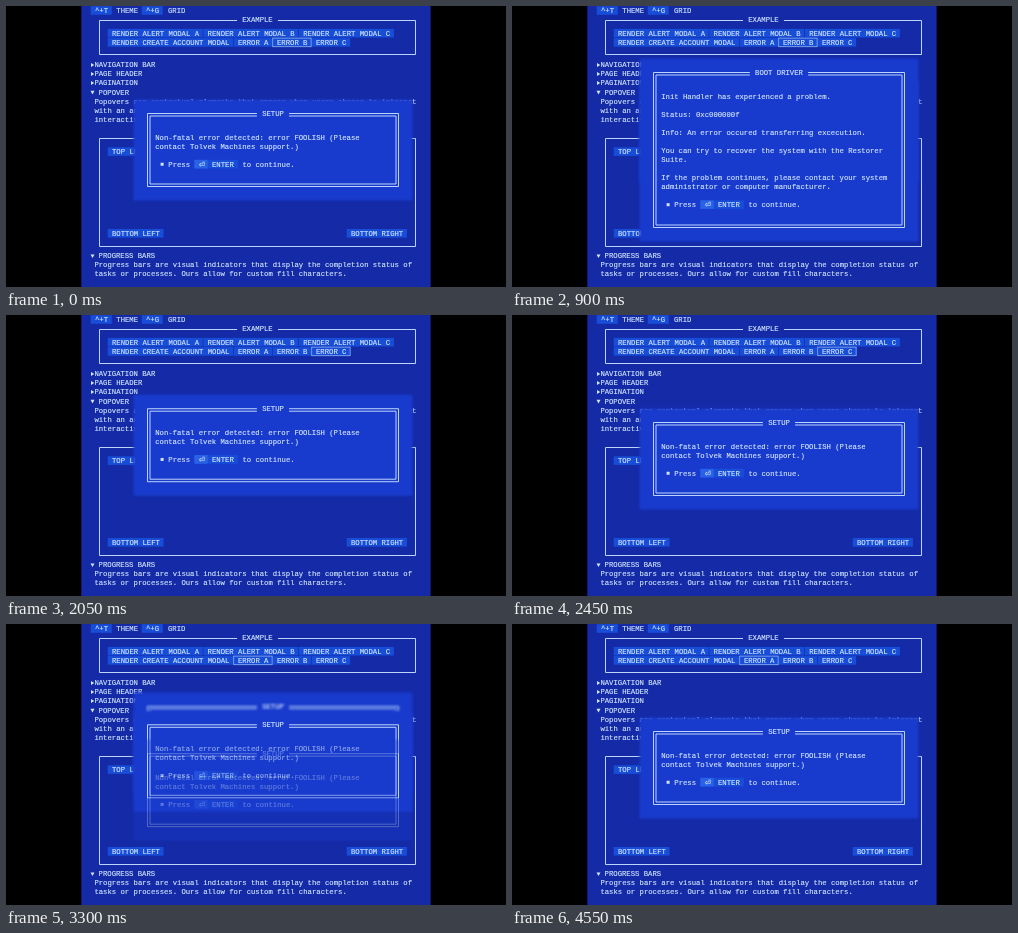
An HTML page that plays this animation: 500 by 281 pixels, repeating every 4600 ms.

```html
<!DOCTYPE html>
<html lang="en">
<head>
<meta charset="utf-8">
<title>Modal stack</title>
<style>
  html, body { margin: 0; width: 100%; height: 100%; overflow: hidden; background: #000; }
  svg { display: block; width: 100vw; height: 100vh; filter: blur(0.3px); }
  text {
    font: 7.25px "Liberation Mono", monospace;
    fill: #d2e6ff; stroke: #d2e6ff; stroke-width: 0.15; white-space: pre;
  }
  .page { fill: #142aa6; }
  .panel { fill: #193bcd; filter: blur(1px); }
  .button { fill: #184dd8; }
  .key { fill: #2a62e6; }
  .line { fill: none; stroke: #bcd4fa; stroke-width: 1; }
  .focus { fill: none; stroke: #8fb4f4; stroke-width: 0.8; }
  .mark { fill: #d2e6ff; }
</style>
</head>
<body>
<svg id="stage" viewBox="0 0 500 281"></svg>
<script>
const LOOP = 4600, MOVE = 250, LIFT = 18.3, DROP = 35;
const CHAR = 4.35, ROW = 9.05, MID = 143.5;
const LEFT = 141.5, RIGHT = 392.5, PAD = 14, HEAD = 23.8;
const stage = document.getElementById('stage');

function add(parent, tag, attrs, content) {
  const el = document.createElementNS('http://www.w3.org/2000/svg', tag);
  for (const name in attrs) el.setAttribute(name, attrs[name]);
  if (content) el.textContent = content;
  parent.appendChild(el);
  return el;
}

// Text is placed by its left edge and the middle of its row.
const label = (parent, x, y, str) => add(parent, 'text', { x, y: y + 2.4 }, str);
const box = (parent, cls, x, y, width, height) =>
  add(parent, 'rect', { class: cls, x, y, width, height });
const path = (parent, cls, d) => add(parent, 'path', { class: cls, d });

function button(parent, x, y, str) {
  const width = str.length * CHAR + 8;
  box(parent, 'button', x - 4.3, y - 4.3, width, 8.6);
  label(parent, x, y, str);
  return { x: x - 4.3, y: y - 4.3, width, height: 8.6 };
}

// A frame whose top edge leaves room for a title.
function frame(parent, x1, y1, x2, y2, mid, title) {
  const gap = (title.length / 2 + 1.2) * CHAR;
  path(parent, 'line', `M${mid - gap} ${y1}H${x1}V${y2}H${x2}V${y1}H${mid + gap}`);
}

function titled(parent, mid, y, title) {
  label(parent, mid - title.length * CHAR / 2, y, title);
}

function item(y, str, open) {
  path(stage, 'mark', open ? `M84.5 ${y - 1.5}h4l-2 3.6z` : `M85 ${y - 2}v4l3.2-2z`);
  label(stage, open ? 92.6 : 88.4, y, str);
}

function drawPage() {
  box(stage, 'page', 75.3, 0, 349.3, 281);
  button(stage, 89, 4.5, '^+T');
  label(stage, 110.3, 4.5, 'THEME');
  button(stage, 140, 4.5, '^+G');
  label(stage, 162, 4.5, 'GRID');

  frame(stage, 93.5, 14.5, 409.5, 48.5, 251.5, 'EXAMPLE');
  titled(stage, 251.5, 13.8, 'EXAMPLE');
  ['A', 'B', 'C'].forEach((c, i) => button(stage, 106 + i * 95.6, 27.2, 'RENDER ALERT MODAL ' + c));
  button(stage, 106, 36.4, 'RENDER CREATE ACCOUNT MODAL');
  const errors = ['A', 'B', 'C'].map((c, i) => button(stage, 232 + i * 39, 36.4, 'ERROR ' + c));

  item(59, 'NAVIGATION BAR');
  item(68, 'PAGE HEADER');
  item(77, 'PAGINATION');
  item(86.3, 'POPOVER', true);
  label(stage, 88.4, 95.4, 'Popovers are contextual elements that appear when users choose to interact');
  label(stage, 88.4, 104.4, 'with an anchor and are');
  label(stage, 88.4, 113.5, 'interactive.');

  path(stage, 'line', 'M93.5 132.5H409.5V240.5H93.5z');
  button(stage, 106, 145.6, 'TOP LEFT');
  button(stage, 106, 227.3, 'BOTTOM LEFT');
  button(stage, 345, 227.3, 'BOTTOM RIGHT');

  item(250, 'PROGRESS BARS', true);
  label(stage, 88.4, 259, 'Progress bars are visual indicators that display the completion status of');
  label(stage, 88.4, 268, 'tasks or processes. Ours allow for custom fill characters.');
  return errors;
}

function drawModal({ title, lines }) {
  const g = add(stage, 'g', {});
  const height = 46.5 + (lines.length + 1) * ROW;
  const top = Math.round(MID - height / 2) + 0.5, bottom = Math.round(top + height) - 0.5;
  const mid = (LEFT + RIGHT) / 2;
  box(g, 'panel', LEFT - PAD, top - PAD, RIGHT - LEFT + 2 * PAD, bottom - top + 2 * PAD);
  frame(g, LEFT, top, RIGHT, bottom, mid, title);
  frame(g, LEFT + 2.5, top + 2.5, RIGHT - 2.5, bottom - 2.5, mid, title);
  titled(g, mid, top + 0.3, title);
  lines.forEach((line, i) => label(g, 149.2, top + HEAD + i * ROW, line));

  const y = top + HEAD + (lines.length + 1) * ROW - 0.3;
  box(g, 'mark', 154.6, y - 1.4, 3, 3);
  label(g, 162.3, y, 'Press');
  box(g, 'button', 188.3, y - 4.3, 43.6, 8.6);
  box(g, 'key', 188.3, y - 4.3, 13.4, 8.6);
  label(g, 192.8, y, '⏎');
  label(g, 206, y, 'ENTER');
  label(g, 236.4, y, 'to continue.');
  return g;
}

const setup = {
  title: 'SETUP',
  lines: ['Non-fatal error detected: error FOOLISH (Please', 'contact Tolvek Machines support.)']
};
const boot = {
  title: 'BOOT DRIVER',
  lines: [
    'Init Handler has experienced a problem.', '',
    'Status: 0xc000000f', '',
    'Info: An error occured transferring excecution.', '',
    'You can try to recover the system with the Restorer', 'Suite.', '',
    'If the problem continues, please contact your system',
    'administrator or computer manufacturer.'
  ]
};
const quit = {
  title: 'TOLVEK',
  lines: [
    "Although you can't use CTRL+ALT+DEL to quit an",
    'application that has stopped responding in this',
    'context, there is no reason to in this state.', '',
    'To quit this website, follow the options below or kill',
    'your browser, or choose to give up and go do something', 'else.'
  ]
};

// Opening and closing times, from the bottom of the stack up.
const stack = [
  { modal: setup, from: -LOOP, to: 2 * LOOP },
  { modal: boot, from: 350, to: 2018 },
  { modal: quit, from: 1180, to: 1800 },
  { modal: setup, from: 2820, to: 4000 },
  { modal: setup, from: 3250, to: 3730 }
];
const hovers = [[0, 1], [1000, 2], [2500, 0]];

const errors = drawPage();
const focus = box(stage, 'focus', 0, 0, 0, 0);
stack.forEach(s => { s.el = drawModal(s.modal); });

function ease(ms) {
  const x = Math.min(1, Math.max(0, ms / MOVE));
  return 1 - (1 - x) ** 2;
}

function draw(t) {
  const [, hover] = hovers.filter(h => h[0] <= t).pop();
  const spot = errors[hover];
  for (const name in spot) focus.setAttribute(name, spot[name]);

  let depth = 0;
  for (let i = stack.length - 1; i >= 0; i--) {
    const { el, from, to } = stack[i];
    const enter = ease(t - from);
    const shown = t >= from && t < to;
    el.style.display = shown ? '' : 'none';
    if (shown) {
      el.setAttribute('transform', `translate(0 ${DROP * (1 - enter) - LIFT * depth})`);
      el.style.opacity = enter;
      el.style.filter = depth > 0.01 ? `blur(${0.8 * depth}px)` : 'none';
    }
    depth += enter - ease(t - to);
  }
}

const start = performance.now();
function tick() {
  draw((performance.now() - start) % LOOP);
  requestAnimationFrame(tick);
}
tick();
</script>
</body>
</html>
```
